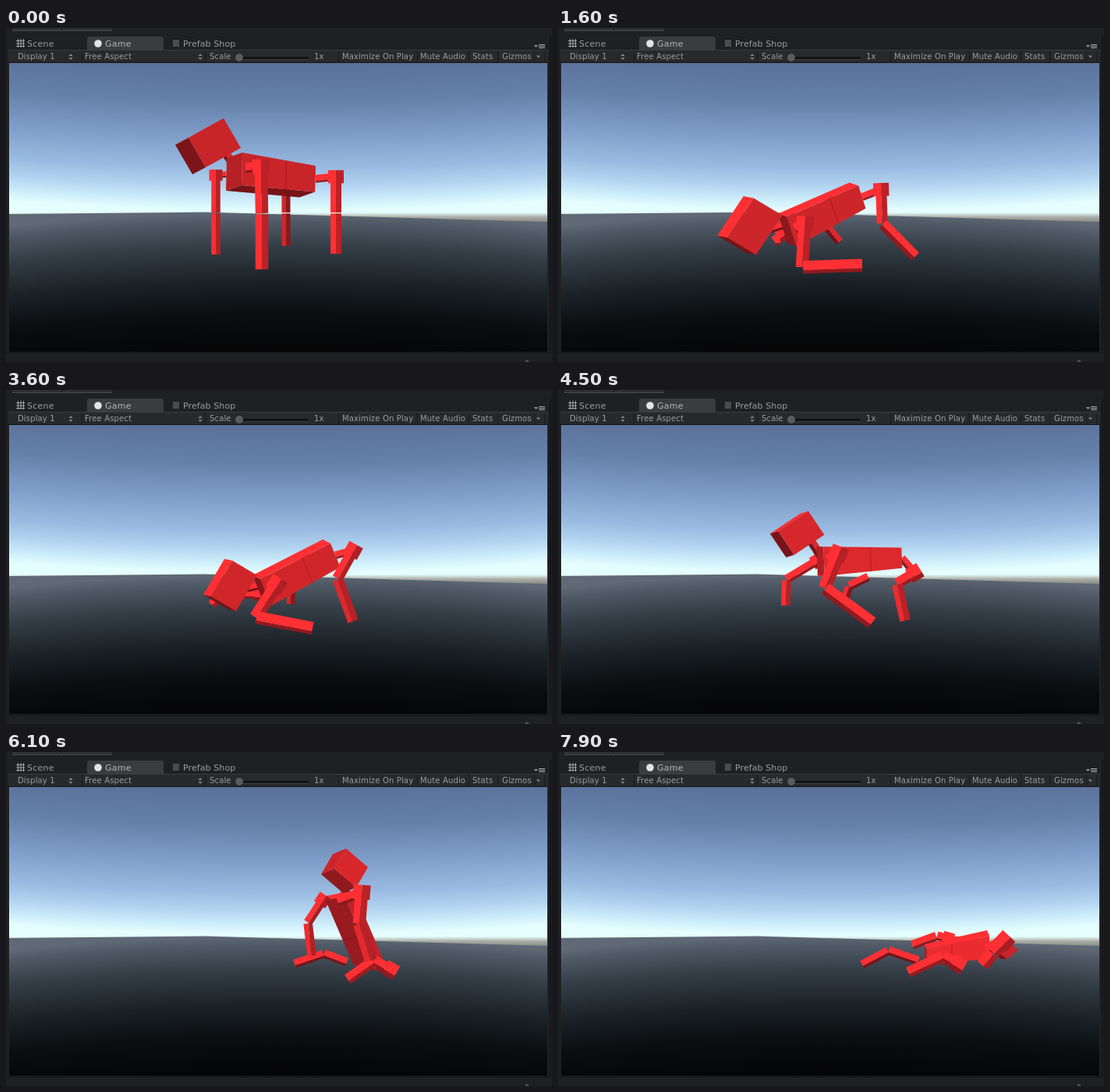
These frames come from a looping animation (700 by 429 pixels, 8 s). An HTML page with a canvas:

```html
<!DOCTYPE html>
<html lang="en">
<head>
<meta charset="utf-8">
<title>Red box creature</title>
<style>
  html, body { margin: 0; width: 100%; height: 100%; overflow: hidden; background: #1f2022; }
  canvas { display: block; }
</style>
</head>
<body>
<canvas id="stage" width="700" height="429"></canvas>
<script>
const ctx = document.getElementById('stage').getContext('2d');
const LOOP = 8000, STEP = 100;

// Head and torso: near corner, then the edge vectors A, B (front face) and C (depth).
// They end with the front tone; the torso also has the taper of its far end.
// Legs: shoulder or hip, knee, foot.
const poses = [
  { time: 200,
    head: [234,141, 45,-25, 22,38, -17,9, .6],
    torso: [303,160, 94,17, -1,42, -20,7, .6, .8],
    nearFront: [327,178, 328,238, 328,310], farFront: [269,189, 269,237, 269,291],
    nearRear: [423,191, 423,237, 423,290], farRear: [359,205, 359,237, 359,280] },
  { time: 800,
    head: [212,270, 38,-49, 36,26, -14,-2, .62],
    torso: [290,250, 92,-34, 10,40, -11,-4, .62, .73],
    nearFront: [314,254, 313,311, 389,304], farFront: [284,272, 268,278, 276,278],
    nearRear: [411,227, 416,274, 462,286], farRear: [345,225, 340,262, 362,274] },
  { time: 2400,
    head: [233,269, 29,-52, 37,18, -12,-3, .64],
    torso: [304,240, 91,-46, 14,36, -12,-4, .64, .78],
    nearFront: [324,250, 313,306, 393,305], farFront: [302,262, 304,272, 312,272],
    nearRear: [424,201, 415,243, 446,296], farRear: [360,208, 352,250, 357,275] },
  { time: 3600,
    head: [263,265, 27,-46, 32,19, -10,-2, .66],
    torso: [326,243, 90,-46, 14,34, -10,-5, .66, .9],
    nearFront: [347,250, 320,292, 393,306], farFront: [325,262, 275,262, 264,276],
    nearRear: [445,206, 425,242, 445,297], farRear: [385,210, 366,250, 365,275] },
  { time: 5200,
    head: [324,167, 40,-11, 10,35, -9,7, .8],
    torso: [371,194, 93,35, -8,38, -7,2, .93, .65],
    nearFront: [387,203, 389,248, 423,298], farFront: [348,212, 332,240, 352,277],
    nearRear: [484,240, 456,250, 445,296], farRear: [425,245, 390,252, 368,273] },
  { time: 6100,
    head: [436,124, 28,24, -15,26, -17,7, .72],
    torso: [434,185, 36,84, -24,6, 13,-4, .25, 1],
    nearFront: [456,180, 453,220, 468,268], farFront: [406,190, 387,219, 392,262],
    nearRear: [493,280, 472,268, 438,292], farRear: [437,270, 408,259, 370,272] },
  { time: 7900,
    head: [590,254, -14,12, -20,-16, -8,0, .6],
    torso: [553,266, -80,6, 0,-30, -3,-7, .85, .6],
    nearFront: [572,243, 558,258, 544,274], farFront: [500,240, 486,236, 454,248],
    nearRear: [513,273, 494,262, 449,283], farRear: [462,268, 424,255, 390,273] }
];
const parts = Object.keys(poses[0]).slice(1);

const linear = u => u, speedUp = u => u * u, fall = u => u ** 1.5;
const rise = u => 1 - (1 - u) ** 2, settle = u => 1 - (1 - u) ** 2.5;
const lift = u => { const v = Math.min(1, 1.35 * u); return v * v * (3 - 2 * v); };
// Horizontal and vertical easing from each pose to the next.
const easing = [[linear, fall], [speedUp, rise], [linear, linear],
                [speedUp, lift], [rise, settle], [linear, fall]];

const mix = (a, b, u) => a + (b - a) * u;
const add = (p, q, k = 1) => [p[0] + q[0] * k, p[1] + q[1] * k];
const cross = (p, q) => p[0] * q[1] - p[1] * q[0];
const clamp = x => Math.min(1, Math.max(0, x));

function turn(p, q, u) {
  const start = Math.atan2(p[1], p[0]);
  let delta = Math.atan2(q[1], q[0]) - start;
  delta -= Math.round(delta / (2 * Math.PI)) * 2 * Math.PI;
  const angle = start + delta * u, length = mix(Math.hypot(...p), Math.hypot(...q), u);
  return [length * Math.cos(angle), length * Math.sin(angle)];
}

function poseAt(time) {
  let i = 0;
  while (i < easing.length - 1 && time > poses[i + 1].time) i++;
  const from = poses[i], to = poses[i + 1];
  const u = clamp((time - from.time) / (to.time - from.time));
  const ux = easing[i][0](u), uy = easing[i][1](u);
  const pose = {};
  for (const name of parts) {
    const a = from[name], b = to[name];
    pose[name] = a.map((v, j) => mix(v, b[j], j % 2 ? uy : ux));
    if (a.length > 6)
      for (let j = 2; j < 8; j += 2)
        pose[name].splice(j, 2, ...turn(a.slice(j, j + 2), b.slice(j, j + 2), (ux + uy) / 2));
  }
  return pose;
}

function red(tone) {
  const t = clamp(tone);
  return `rgb(${mix(118, 255, t)},${mix(20, 48, t)},${mix(24, 52, t)})`;
}

function polygon(color, ...points) {
  ctx.beginPath();
  points.forEach(p => ctx.lineTo(...p));
  ctx.closePath();
  ctx.fillStyle = color;
  ctx.fill();
}

function lightFrom(v) {
  const n = Math.hypot(...v) || 1;
  return .55 - .2 * v[0] / n - .7 * v[1] / n;
}

// Front face A x B, plus whichever side faces the depth vector C uncovers.
function box(o, A, B, C, tone, taper = 1) {
  const far = add(o, A), farEdge = add(far, B, taper), nearEdge = add(o, B);
  const longAtO = cross(A, B) * cross(A, C) < 0;
  const endAtO = cross(B, A) * cross(B, C) < 0;
  const side = (p, q, light) => polygon(red(light), p, q, add(q, C), add(p, C));
  const outward = (edge, atO) => add([C[0] / 2, C[1] / 2], edge, atO ? -.5 : .5);
  const endLight = lightFrom(outward(A, endAtO)) - .35;
  endAtO ? side(o, nearEdge, endLight) : side(far, farEdge, endLight);
  const longLight = lightFrom(outward(B, longAtO));
  longAtO ? side(o, far, longLight) : side(nearEdge, farEdge, longLight);
  polygon(red(tone), o, far, farEdge, nearEdge);
}

// A beam seen along an edge: a lit strip and a shaded one.
function beam(p, q, width, bias = 0) {
  const A = add(q, p, -1), length = Math.hypot(...A) || 1;
  let n = [-A[1] / length, A[0] / length];
  if (n[0] * .5 + n[1] * .85 > 0) n = [-n[0], -n[1]];
  const share = .5 - .25 * n[1] * Math.abs(n[1]);
  const a = add(p, n, width / 2), b = add(q, n, width / 2);
  const c = add(a, n, -width * share), d = add(b, n, -width * share);
  polygon(red(lightFrom(n) + .25 + bias), a, b, d, c);
  polygon(red(.2 + .3 * n[0] * n[0] * (n[0] < 0) + bias), c, d,
          add(q, n, -width / 2), add(p, n, -width / 2));
}

function leg(joints, width, cube, bias) {
  const top = joints.slice(0, 2), knee = joints.slice(2, 4), foot = joints.slice(4);
  const unit = (p, q) => {
    const v = add(q, p, -1), n = Math.hypot(...v) || 1;
    return [v[0] / n, v[1] / n];
  };
  const down = unit(top, knee);
  beam(top, knee, width, bias);
  beam(add(knee, unit(knee, foot), 1.2), foot, width, bias);
  if (cube) beam(add(top, down, -cube * .42), add(top, down, cube * .42), cube, bias);
}

function vectors(part) {
  return [0, 2, 4, 6].map(i => part.slice(i, i + 2));
}

function drawCreature(pose) {
  const [to, tA, tB, tC] = vectors(pose.torso);
  const [ho, hA, hB, hC] = vectors(pose.head);
  const [tone, taper] = pose.torso.slice(8);
  leg(pose.farRear, 11, 0, -.35);
  beam(add(add(to, tC), tB, .5), pose.farFront.slice(0, 2), 8, -.2);
  leg(pose.farFront, 11.5, 17, -.05);
  beam(add(add(ho, hA, .6), hB, .9), add(add(to, tC, .5), tB, .3), 11, -.3);
  beam(add(add(to, tA), tB, taper / 2), pose.nearRear.slice(0, 2), 10);
  box(to, tA, tB, tC, tone, taper);
  const seam = add(to, tA, .6);
  ctx.strokeStyle = 'rgba(70,0,0,.28)';
  ctx.lineWidth = 1;
  ctx.beginPath();
  ctx.moveTo(...seam);
  ctx.lineTo(...add(seam, tB, mix(1, taper, .6)));
  ctx.stroke();
  leg(pose.nearRear, 14, 20);
  box(ho, hA, hB, hC, pose.head[8]);
  beam(add(add(to, tB, .45), tA, .05), pose.nearFront.slice(0, 2), 13, -.08);
  leg(pose.nearFront, 16.5, 22);
}

function rect(x, y, w, h, color) {
  ctx.fillStyle = color;
  ctx.fillRect(x, y, w, h);
}

function dot(x, y, r, color) {
  ctx.beginPath();
  ctx.arc(x, y, r, 0, 7);
  ctx.fillStyle = color;
  ctx.fill();
}

function shade(gradient, colors) {
  colors.forEach(([at, color]) => gradient.addColorStop(at, color));
  return gradient;
}

function radial(cy, r0, r1, colors) {
  return shade(ctx.createRadialGradient(350, cy, r0, 350, cy, r1), colors);
}

function drawWorld() {
  rect(4, 45, 690, 371, radial(-4500, 4545, 4738, [
    [0, '#5a7098'], [.25, '#6480a9'], [.5, '#7f9fca'], [.7, '#9abbe1'],
    [.82, '#b2d4f0'], [.92, '#cfeffb'], [.98, '#e4fdfd']]));
  // Haze between the level skyline and the sloping edge of the ground.
  rect(4, 237, 690, 13, shade(ctx.createLinearGradient(0, 237, 0, 249),
    [[0, '#a9aba400'], [.5, '#a9aba4'], [1, '#8b8d88']]));
  ctx.save();
  ctx.beginPath();
  ctx.moveTo(4, 239);
  ctx.lineTo(255, 236.5);
  ctx.lineTo(694, 249);
  ctx.lineTo(694, 416);
  ctx.lineTo(4, 416);
  ctx.clip();
  rect(4, 230, 690, 186, radial(3500, 3084, 3264, [
    [0, '#050506'], [.25, '#0a0c0e'], [.5, '#1a2126'],
    [.75, '#343d46'], [.93, '#505a66'], [1, '#606975']]));
  ctx.restore();
}

function label(text, x, y, size, spacing, color = '#9c9c9c') {
  ctx.font = `${size}px "DejaVu Sans", sans-serif`;
  ctx.letterSpacing = spacing + 'px';
  ctx.fillStyle = color;
  ctx.fillText(text, x, y);
}

function drawInterface() {
  rect(0, 0, 700, 45, '#1f2022');
  rect(0, 45, 4, 384, '#1f2022');
  rect(694, 45, 6, 384, '#1f2022');
  rect(0, 416, 700, 13, '#1f2022');
  rect(697, 10, 2, 406, '#141516');
  rect(0, 417, 700, 1, '#121314');
  rect(8, 0, 128, 3, '#303133');
  rect(8, 3, 128, 1, '#4a4b4c');
  rect(71, 0, 1, 3, '#151617');

  rect(3, 28, 692, 17, '#28292b');
  rect(3, 28, 692, 1, '#3a3b3c');
  rect(3, 44, 692, 1, '#151617');
  ctx.beginPath();
  ctx.roundRect(104, 11, 98, 18, [3, 3, 0, 0]);
  ctx.fillStyle = '#3b3c3e';
  ctx.fill();
  for (let i = 0; i < 3; i++) {
    rect(15 + i * 3.5, 14, 1, 11, '#a5a5a5');
    rect(13, 16 + i * 3.5, 11, 1, '#a5a5a5');
  }
  dot(118, 20, 4.8, '#e4e4e4');
  rect(214, 15, 8, 9, '#4b4c4e');
  label('Scene', 27, 24, 11, .25);
  label('Game', 127, 24, 11, .25, '#b4b4b4');
  label('Prefab Shop', 227, 24, 11, .1);

  [97, 255, 426, 527, 593, 630, 677, 690].forEach(x => rect(x, 29, 1, 15, '#18191a'));
  [['Display 1', 15], ['Free Aspect', 101], ['Scale', 261], ['1x', 395],
   ['Maximize On Play', 431], ['Mute Audio', 531], ['Stats', 598], ['Gizmos', 636]]
    .forEach(([text, x]) => label(text, x, 40, 10, .15));
  [83, 249].forEach(x => {
    polygon('#858585', [x - 2.5, 36], [x + 2.5, 36], [x, 33]);
    polygon('#858585', [x - 2.5, 38], [x + 2.5, 38], [x, 41]);
  });
  rect(300, 37, 88, 3, '#121314');
  rect(300, 40, 88, 1, '#414244');
  dot(299, 38, 5, '#5a5b5d');
  polygon('#858585', [680, 35.5], [685, 35.5], [682.5, 38.5]);
  polygon('#999', [677, 22], [682, 22], [679.5, 25]);
  [21, 23, 25].forEach(y => rect(683, y, 8, 1, '#aaa'));
  dot(668, 429, 2.5, '#55565a');
}

function render(now) {
  const time = Math.floor(now % LOOP / STEP) * STEP;
  drawWorld();
  drawCreature(poseAt(time));
  drawInterface();
  requestAnimationFrame(render);
}
requestAnimationFrame(render);
</script>
</body>
</html>
```
